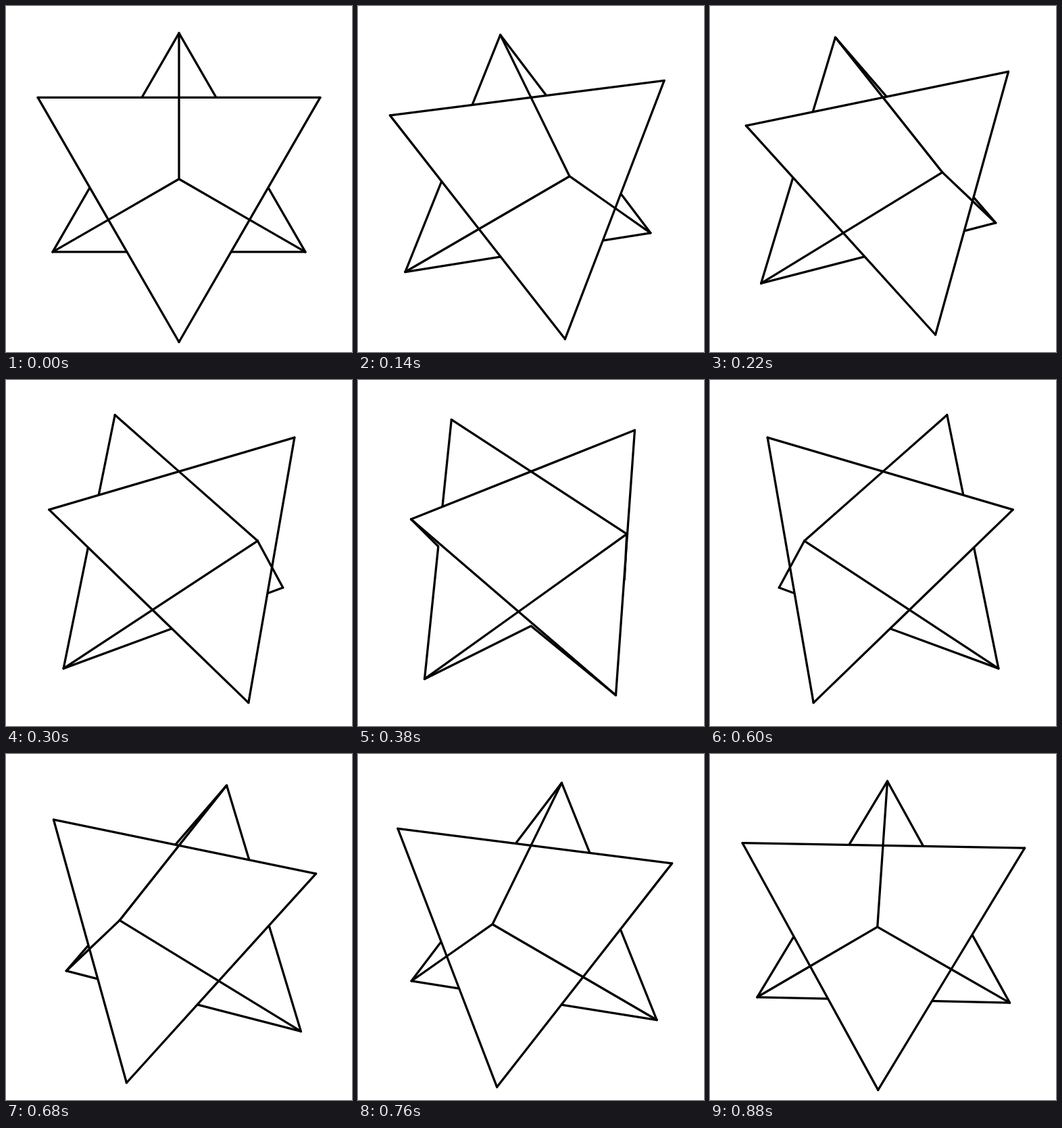
An HTML page with a canvas for the animation above (900 ms loop, 512 px wide and 512 px high).

```html
<!DOCTYPE html>
<html lang="en">
<head>
<meta charset="utf-8">
<title>Turning stellated octahedron</title>
<style>
  html, body { margin: 0; width: 100%; height: 100%; overflow: hidden; background: #fff; }
  canvas { display: block; width: 512px; height: 512px; }
</style>
</head>
<body>
<canvas id="stage" width="512" height="512"></canvas>
<script>
const ctx = document.getElementById('stage').getContext('2d');

const LOOP = 900, STEP = 20, TURN = Math.PI / 2;
const CENTER = 256, ZOOM = 1450, CAMERA = 6;
const HALF = 1 / Math.sqrt(3);               // half the side of the enclosing cube
const TILT_COS = Math.sqrt(2 / 3), TILT_SIN = Math.sqrt(1 / 3);
const FACING = 1 / (3 * CAMERA);             // depth above which a face looks at the camera

const SIGNS = [-1, 1];
const TIPS = SIGNS.flatMap(x => SIGNS.flatMap(y => SIGNS.map(z => [x, y, z])));

const onAxis = (v, i) => v.map((c, j) => j === i ? c : 0);
const flip = (v, i) => v.map((c, j) => j === i ? -c : c);

// Spin about the cube's upright axis, then tip that axis towards the viewer.
function rotate([x, y, z], angle) {
  const c = Math.cos(angle) * HALF, s = Math.sin(angle) * HALF;
  const depth = x * s + z * c;
  y *= HALF;
  return [x * c - z * s, y * TILT_COS - depth * TILT_SIN, y * TILT_SIN + depth * TILT_COS];
}

function project([x, y, z]) {
  const k = ZOOM / (CAMERA - z);
  return [CENTER + x * k, CENTER - y * k];
}

function fill(...points) {
  ctx.beginPath();
  points.forEach(p => ctx.lineTo(...p));
  ctx.fill();
}

function line(a, b) {
  ctx.beginPath();
  ctx.moveTo(...a);
  ctx.lineTo(...b);
  ctx.stroke();
}

function draw(progress) {
  const angle = Math.PI / 4 - progress * TURN;
  const depth = v => rotate(v, angle)[2];
  const place = v => project(rotate(v, angle));
  const faces = v => depth(v) > FACING;
  const base = v => [0, 1, 2].map(i => place(onAxis(v, i)));

  function spike(v) {
    const tip = place(v), feet = base(v);
    feet.forEach((p, i) => fill(tip, p, feet[(i + 1) % 3]));
    feet.forEach((p, i) => {
      if (faces(flip(v, (i + 1) % 3)) || faces(flip(v, (i + 2) % 3))) line(tip, p);
    });
  }

  ctx.fillStyle = '#fff';
  ctx.fillRect(0, 0, 512, 512);
  ctx.strokeStyle = '#000';
  ctx.lineWidth = 3.3;
  ctx.lineCap = 'round';

  // Painter's order: rear spikes, the solid core, front spikes.
  const sorted = [...TIPS].sort((a, b) => depth(a) - depth(b));
  sorted.filter(v => !faces(v)).forEach(spike);
  TIPS.forEach(v => fill(...base(v)));
  sorted.filter(faces).forEach(spike);
}

const start = performance.now();
function tick() {
  const t = (performance.now() - start) % LOOP;
  draw(Math.floor(t / STEP) * STEP / LOOP);
  requestAnimationFrame(tick);
}
tick();
</script>
</body>
</html>
```
